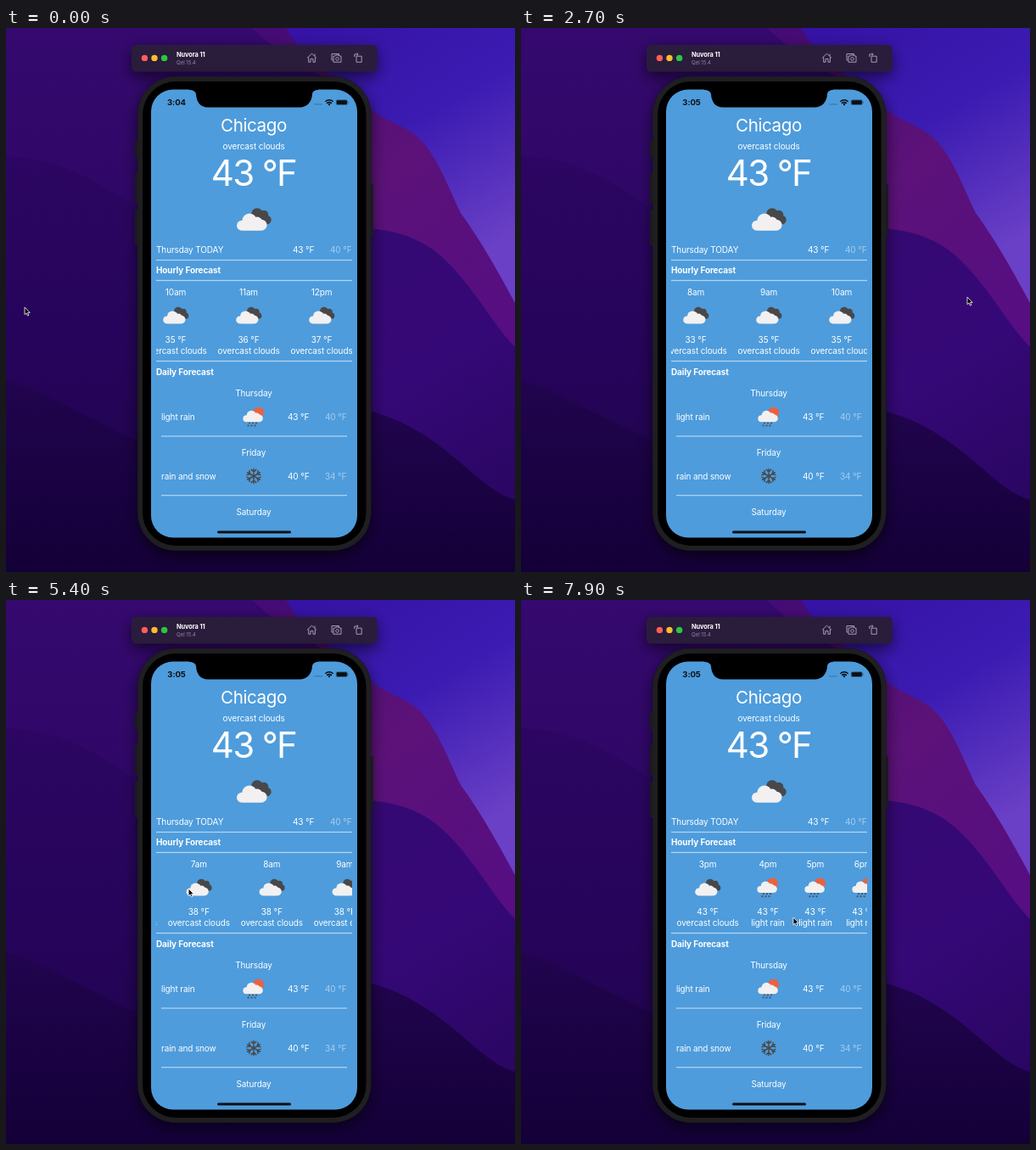
Recreate the animation shown at these times as an HTML page. Size 600 by 641 pixels, loop 8000 ms.

```html
<!DOCTYPE html>
<html lang="en">
<head>
<meta charset="utf-8">
<title>Weather forecast</title>
<style>
html, body { margin: 0; width: 100%; height: 100%; overflow: hidden; background: #1b0048; }
svg { display: block; width: 600px; height: 641px; }
text { font: 10px Inter, Roboto, sans-serif; fill: #fff; letter-spacing: -.012em; white-space: pre; }
.bold { font-weight: 700; }
.mid { text-anchor: middle; }
.low { fill-opacity: .5; }
</style>
</head>
<body>
<svg id="stage" viewBox="0 0 600 641"></svg>
<script>
const text = (x, y, s, cls = "", style = "") =>
  `<text x="${x}" y="${y}" class="${cls}" style="${style}">${s}</text>`;
const box = (x, y, w, h, r, fill) =>
  `<rect x="${x}" y="${y}" width="${w}" height="${h}" rx="${r}" fill="${fill}"/>`;
const dot = (x, y, r, fill) => `<circle cx="${x}" cy="${y}" r="${r}" fill="${fill}"/>`;
const line = (x1, x2, y) => box(x1, y - .6, x2 - x1, 1.2, 0, "#b5d6f1");
const at = (x, y, s, body) => `<g transform="translate(${x} ${y}) scale(${s})">${body}</g>`;
const shape = (d, fill) => `<path d="${d}" fill="${fill}"/>`;
const gradient = (id, x2, y2, ...stops) =>
  `<linearGradient id="${id}" x2="${x2}" y2="${y2}">` + stops.map((c, i) =>
    `<stop offset="${i / (stops.length - 1)}" stop-color="${c}"/>`).join("") + "</linearGradient>";
const repeat = (n, f) => Array.from({ length: n }, (_, i) => f(i)).join("");

// Values between key rows [time, ...values]
const linear = p => p, smooth = p => p * p * (3 - 2 * p);
function sample(keys, t, ease) {
  const n = keys.findIndex((k, i) => i && k[0] >= t), a = keys[n - 1], b = keys[n];
  const p = ease((t - a[0]) / (b[0] - a[0]));
  return a.slice(1).map((v, j) => v + (b[j + 1] - v) * p);
}

// Weather icons, centred on 0,0
const dark = "#48484a", pale = "#f2f0f0";
const whiteCloud = dot(-14, 6.7, 6, pale) + dot(-5, 1, 8.6, pale) + dot(4, 3, 6.4, pale) +
  dot(9, 6.2, 6.5, pale) + box(-15, 4, 25, 8.7, 4, pale);
const clouds = dot(4, -7, 6.8, dark) + dot(12, -6, 5.3, dark) + dot(15.5, 0, 5.2, dark) +
  box(3, -6, 12, 11.2, 3, dark) + whiteCloud;
const smallClouds = at(0, 0, .74, clouds);
const rain = dot(5.6, -5.2, 6.4, "#ea623f") + at(.6, -2.5, .66, whiteCloud) +
  repeat(6, i => dot(-5 + i % 3 * 4 - (i > 2 ? 1.5 : 0), i > 2 ? 10.3 : 7.3, 1, dark));
const flake = `<g fill="none" stroke="${dark}" stroke-width="1.5" stroke-linecap="round">` +
  repeat(6, i => `<path d="M0 0V-8.5M-2.8 -7.6L0 -5 2.8 -7.6" transform="rotate(${i * 60})"/>`) + "</g>";

const kinds = {
  o: ["overcast clouds", 86, smallClouds],
  b: ["broken clouds", 86, smallClouds],
  r: ["light rain", 56, rain],
  l: ["light snow", 59, flake],
  s: ["snow", 56, flake]
};
const sky = "o1 r5 o5 b2 o6 l5 r3 s4 l3 o14".split(" ").map(run => run[0].repeat(run.slice(1))).join("");
const heat = [[0, 43], [4, 43], [10, 39], [26, 36.6], [34, 33.6], [36, 33], [41, 33.4], [42, 34.6], [47, 38.4]];

// Lay the hours out side by side, starting at 3pm
const centers = [];
let hours = "", left = 177;
[...sky].forEach((k, i) => {
  const [name, width, icon] = kinds[k], hour = (15 + i) % 24, x = left + width / 2;
  const degrees = Math.round(sample(heat, i, linear)[0]);
  centers.push(x);
  hours += text(x, 314.5, (hour % 12 || 12) + (hour < 12 ? "am" : "pm"), "mid") +
    at(x, 339, 1, icon) + text(x, 371.3, degrees + " °F", "mid") + text(x, 384, name, "mid");
  left += width;
});

const wallpaper = gradient("base", 0, 1, "#35096f", "#2c0662", "#1e0448") +
  gradient("sky", .5, 1, "#3512a4", "#3b1bb2", "#6a40c6") +
  gradient("ribbon", .6, 1, "#430b75", "#5c1278", "#560e82") +
  gradient("hill", .3, 1, "#350972", "#350877", "#2a0662") +
  gradient("left", 0, 1, "#2c0662", "#26045a", "#1c0347") +
  gradient("floor", 0, 1, "#21044e", "#140038") +
  box(0, 0, 600, 641, 0, "url(#base)") +
  shape("M290 0H600V440H420V100C400 60 340 50 290 0Z", "url(#ribbon)") +
  shape("M330 0H600V324C570 268 552 240 536 218C520 185 508 150 486 129C466 113 448 110 432 97C400 62 355 45 330 0Z", "url(#sky)") +
  shape("M0 151C60 153 110 178 170 225V641H0Z", "url(#left)") +
  shape("M400 234C470 236 500 252 530 286C560 320 575 350 600 376V641H400Z", "url(#hill)") +
  shape("M0 415C50 430 100 462 170 494V641H0Z", "url(#floor)") +
  shape("M400 446C470 455 510 490 545 520C565 537 580 550 600 556V641H150V560Z", "url(#floor)");

const titleBar = `<g filter="url(#shadow)">` + box(148, 20, 289.5, 31.5, 5, "#2b1a3a") + "</g>" +
  ["#fe5f57", "#febc2e", "#28c840"].map((c, i) => dot(163.4 + i * 11.6, 35.4, 3.7, c)).join("") +
  text(201, 34.2, "Nuvora 11", "bold", "font-size:7.4px") +
  text(201, 43, "Qel 15.4", "", "font-size:6.2px;fill:#9286a0") +
  `<g fill="none" stroke="#a79bb3">
    <path d="M355 35.3L360.5 30.2 366 35.3M356.7 34.5V40.2H359V36.4H362V40.2H364.4V34.5M364 30.5V33"/>
    <path d="M385.5 38H384V30.5H392.5V32M386 33H388L389 32H392L393 33H395V40.2H386Z"/>
    <circle cx="390.5" cy="36.4" r="1.8"/>
    <path d="M413 33.2H419.2V40.2H413ZM410.8 34V31H415M413.5 29.4L415.2 31 413.5 32.6"/>
  </g>`;

const button = (x, y, h) => box(x, y, 4, h, 1, "#1b1b1f");
const phone = `<g filter="url(#shadow)">` + box(155, 57, 275.5, 559, 45, "#18181b") + "</g>" +
  button(152, 132, 21) + button(152, 171, 35) + button(152, 214, 42) + button(429, 184, 61) +
  box(155.5, 57.5, 274.5, 558, 44.5, "#1f1f22") +
  box(161, 63, 263.5, 547, 39, "#000") +
  box(171, 72.5, 243, 528, 26, "#4e9cdc") +
  shape("M216 72H368V73C364 73 361.5 74.5 361 78C360.5 87 355 93.5 346 93.5H238C229 93.5 224.5 87 224 78C223.5 74.5 220 73 216 73Z", "#000");

const ink = "#0a1016";
const status = `<text id="clock" x="201" y="91.3" class="mid bold" style="font-size:9.6px;fill:${ink}"></text>` +
  box(363, 89.3, 10, 1.2, .6, "#3c79ab") +
  `<path d="M376.3 86.8Q381 82.8 385.7 86.8M378.1 88.8Q381 86.4 383.9 88.8" fill="none" stroke="${ink}" stroke-width="1.5"/>` +
  dot(381, 90.2, 1.1, ink) + box(388.8, 84.3, 14, 6.8, 2, "#32688f") +
  box(389.8, 85.3, 12, 4.8, 1, ink) + box(403.2, 86.7, .9, 2, .4, "#32688f");

const range = (x, y, high, low) => text(x, y, high + " °F") + text(x + 44, y, low + " °F", "low");
const day = (y, name, desc, icon, high, low) => text(292, y, name, "mid") +
  text(183, y + 28.3, desc) + at(292, y + 24.3, 1, icon) + range(332, y + 28.3, high, low) +
  line(183, 402, y + 47);

const screen = text(292, 122, "Chicago", "mid", "font-size:20.6px;letter-spacing:-.02em") +
  text(292, 143, "overcast clouds", "mid") +
  text(292, 186, "43 °F", "mid", "font-size:42px;letter-spacing:-.04em") +
  at(292, 226, 1, clouds) +
  text(177, 265, "Thursday TODAY") + range(338, 265, 43, 40) +
  line(177, 408, 273.5) + text(177, 289, "Hourly Forecast", "bold") + line(177, 408, 297.5) +
  `<g clip-path="url(#strip)"><g id="hours">${hours}</g></g>` +
  line(177, 408, 392.5) + text(177, 409.4, "Daily Forecast", "bold") +
  day(434, "Thursday", "light rain", rain, 43, 40) +
  day(503.7, "Friday", "rain and snow", flake, 40, 34) +
  text(292, 573.5, "Saturday", "mid") + box(249, 592.4, 87, 3, 1.5, ink);

const get = id => document.getElementById(id);
get("stage").innerHTML = `<defs>
  <clipPath id="strip"><rect x="177" y="298" width="231" height="94"/></clipPath>
  <filter id="shadow" x="-30%" y="-100%" width="160%" height="300%">
    <feDropShadow dx="0" dy="6" stdDeviation="9" flood-color="#000" flood-opacity=".6"/></filter>
  </defs>` + wallpaper + titleBar + phone + status + screen +
  `<path id="cursor" d="M0 0V8.6L2 6.9 3.4 10 4.9 9.3 3.5 6.4H6.2Z" fill="#000" stroke="#fff" stroke-width=".8"/>`;

// Each swipe: start time, list offset from an hour and where it stands, pointer
const stop = (t, hour, x, px, py) => [t, x - centers[hour], px, py];
const swipes = [
  stop(0, 43, 200, 22, 329),
  stop(1700, 46, 249, 309, 325),
  stop(2700, 41, 206, 526, 317),
  stop(3600, 34, 238.5, 213, 329),
  stop(4700, 24, 241, 207, 336),
  stop(6200, 9, 266, 225, 345),
  stop(7900, 0, 220, 321, 374)
];

function draw(now) {
  const t = Math.floor(now % 8000 / 100) * 100;
  const [offset, x, y] = sample(swipes, t, smooth);
  get("hours").setAttribute("transform", `translate(${offset} 0)`);
  get("cursor").setAttribute("transform", `translate(${x} ${y})`);
  get("clock").textContent = t < 800 ? "3:04" : "3:05";
  requestAnimationFrame(draw);
}
draw(performance.now());
</script>
</body>
</html>
```
